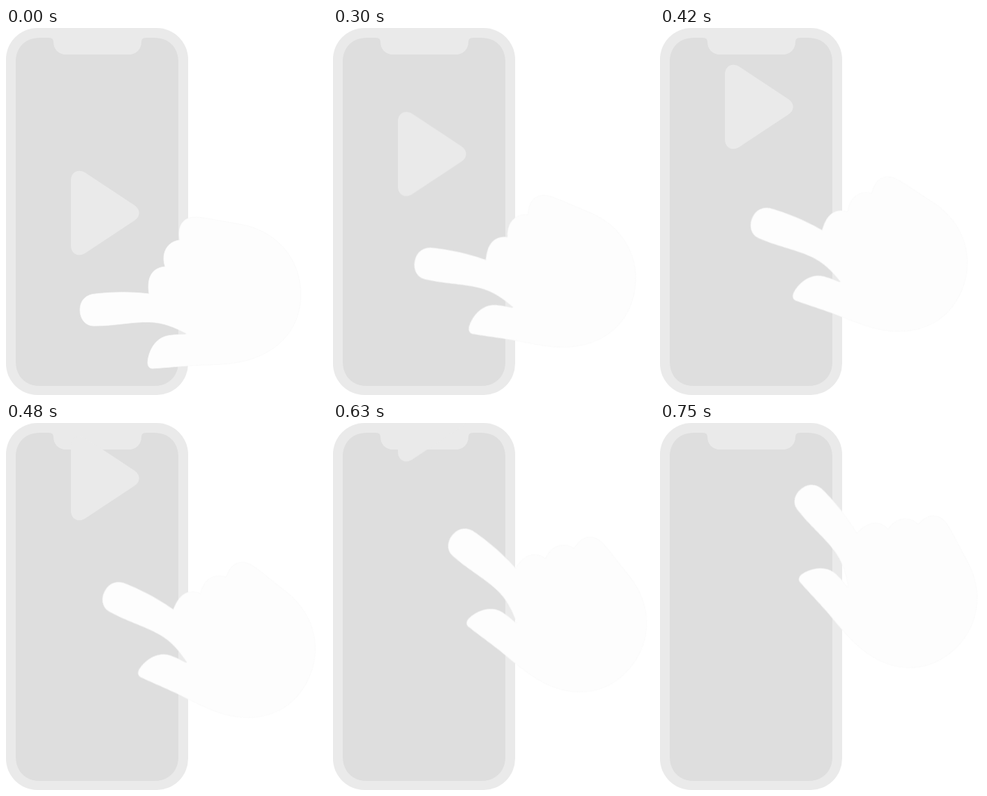
An HTML page that plays this animation: 460x526 px, repeating every 1500 ms.

```html
<!DOCTYPE html>
<html lang="en">
<head>
<meta charset="utf-8">
<title>Swipe up</title>
<style>
  html, body { margin: 0; width: 100%; height: 100%; overflow: hidden; background: #fff; }
  svg { display: block; width: 460px; height: 526px; }
  .body, .play { fill: #eaeaea; }
  .screen { fill: #dedede; }
  .hand { fill: #fdfdfd; stroke: #f9f9f9; stroke-width: .8; }
  .play, .hand { transform-box: view-box; transform-origin: 0 0; }
</style>
</head>
<body>
<svg viewBox="0 0 460 526">
  <rect class="body" width="261" height="526" rx="45"/>
  <path class="screen" d="M14 48 C14 28 28 14 48 14 H62 Q68 14 68 20 C68 30 75 38 86 38
    H176 C187 38 194 30 194 20 Q194 14 200 14 H213 C233 14 247 28 247 48
    V479 C247 499 233 513 213 513 H48 C28 513 14 499 14 479 Z"/>
  <path class="play" d="M93 218 C93 207 103 201 113 207 L184 254 C193 260 193 270 184 276
    L113 323 C103 329 93 323 93 312 Z"/>
  <path class="hand" d="M249 304 C246 288 250 271 272 271 C281 271 310 277 335 281
    C387 290 422.5 330 422.5 382 C422.5 430 392 462 350 475 C330 481 312 482 290 483
    C265 483 240 486 210 488 C205 488 203 484 203 479 C204 465 212 447 228 442
    C238 439 248 440 258 439 L258 437.5 C241 429 226 422 205 421.5
    C180 421 155 427 126 427 C113 427 106 416 106 404 C106 391 114 382 128 381
    C155 378 180 378 205 381 C202 362 206 344 228 342 C222 324 230 306 249 304 Z"/>
</svg>
<script>
  const LOOP = 1500, START = 150, END = 750, STEPS = 20;

  // Hold, move in even steps, hold again.
  function swipe(selector, from, to) {
    document.querySelector(selector).animate([
      { offset: 0, transform: from },
      { offset: START / LOOP, transform: from, easing: `steps(${STEPS}, end)` },
      { offset: END / LOOP, transform: to },
      { offset: 1, transform: to }
    ], { duration: LOOP, iterations: Infinity });
  }

  // The hand turns about a knuckle that travels in a straight line.
  const knuckle = { x: 229, y: 264 };
  const handPose = (x, y, turn) =>
    `translate(${x}px, ${y}px) rotate(${turn}deg) translate(${-knuckle.x}px, ${-knuckle.y}px)`;

  swipe('.hand', handPose(knuckle.x, knuckle.y, 0), handPose(389, 105, 52));
  swipe('.play', 'translate(0px, 0px)', 'translate(0px, -338px)');
</script>
</body>
</html>
```
